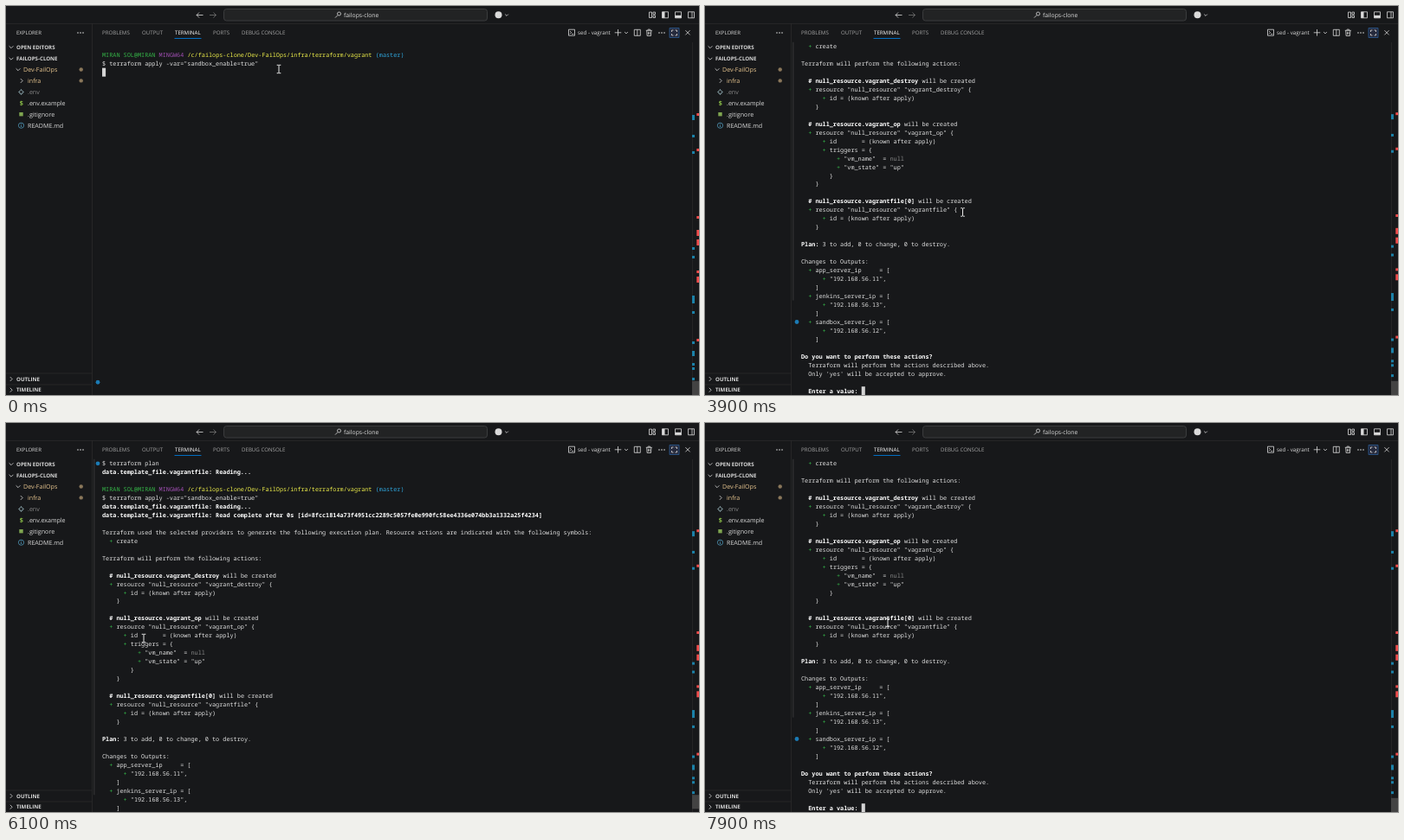
These frames come from a looping animation (800x450 px, 8000 ms). An HTML page with a canvas:

```html
<!DOCTYPE html>
<html lang="en">
<head>
<meta charset="utf-8">
<title>Terminal session</title>
<style>
html, body { margin: 0; width: 100%; height: 100%; overflow: hidden; background: #17181a; }
canvas { display: block; }
</style>
</head>
<body>
<canvas id="stage" width="800" height="450"></canvas>
<script>
const ctx = document.getElementById('stage').getContext('2d');
ctx.textRendering = 'geometricPrecision';

const LOOP = 8000, STEP = 100;
const LEFT = 111, TOP = 41.8, ROW = 9.96, CELL = 4.1, ROWS = 41;
const UI = '"Open Sans", sans-serif';
const MONO = '"Noto Sans Mono", monospace';
const LIGHT = '#dadada';
const INK = { n: '#e2e2e2', b: '#ffffff', g: '#35b548', m: '#a24fb4', y: '#efef4a', c: '#2fa8e0', d: '#858585' };

// "~x" switches the text style to INK.x
const lines = `$ terraform plan
~bdata.template_file.vagrantfile: Reading...

~gMIRAN SOL@MIRAN ~mMINGW64 ~y/c/failops-clone/Dev-FailOps/infra/terraform/vagrant ~c(master)
$ terraform apply -var="sandbox_enable=true"
~bdata.template_file.vagrantfile: Reading...
~bdata.template_file.vagrantfile: Read complete after 0s [id=8fcc1814a73f4951cc2289c5057fe0e990fc58ee4336e074bb3a1332a25f4234]

Terraform used the selected providers to generate the following execution plan. Resource actions are indicated with the following symbols:
  + create

Terraform will perform the following actions:

~b  # null_resource.vagrant_destroy~n will be created
  + resource "null_resource" "vagrant_destroy" {
      + id = (known after apply)
    }

~b  # null_resource.vagrant_op~n will be created
  + resource "null_resource" "vagrant_op" {
      + id       = (known after apply)
      + triggers = {
          + "vm_name"  = ~dnull
          + "vm_state" = "up"
        }
    }

~b  # null_resource.vagrantfile[0]~n will be created
  + resource "null_resource" "vagrantfile" {
      + id = (known after apply)
    }

~bPlan:~n 3 to add, 0 to change, 0 to destroy.

Changes to Outputs:
  + app_server_ip     = [
      + "192.168.56.11",
    ]
  + jenkins_server_ip = [
      + "192.168.56.13",
    ]
  + sandbox_server_ip = [
      + "192.168.56.12",
    ]

~bDo you want to perform these actions?
  Terraform will perform the actions described above.
  Only 'yes' will be accepted to approve.

~b  Enter a value: `.split('\n').map(line => line.replace(/^( +)\+/, '$1~g+~n'));

// [time, value] steps
const printed = [[0, 5], [1800, 6], [1900, 7], [2200, 44], [2800, 50]];
const scroll = [[0, 2], [2200, 4], [2800, 9], [4000, 7], [4100, 5], [4200, 3], [4300, 1], [4400, 0],
  [6700, 1], [6800, 3], [6900, 5], [7000, 9]];
const pointer = [[0, 315, 73], [1200, 315, 73], [1500, 315, 72], [3100, 315, 72], [3800, 297.5, 238.5],
  [4800, 297.5, 238.5], [5500, 200, 178], [5800, 190, 176], [6100, 159, 249], [6350, 130, 318],
  [6600, 264.5, 263], [7200, 264.5, 263], [7800, 211, 231], [LOOP, 211, 231]];

// Overview ruler: [top, height]
const blueMarks = [[126, 6], [149, 3], [168, 3], [279, 3], [289, 3], [335, 9], [353, 3], [388, 3],
  [399, 6], [413, 3], [418, 3], [430, 3]];
const redMarks = [[124, 3], [165, 3], [243, 3], [259, 7], [270, 7], [306, 3], [313, 7], [385, 3]];

const stepAt = (steps, t) => steps.findLast(([start]) => start <= t)[1];

function pointerAt(t) {
  const i = pointer.findIndex(p => p[0] > t);
  const a = pointer[i - 1], b = pointer[i];
  const u = (t - a[0]) / (b[0] - a[0]), e = u * u * (3 - 2 * u);
  return [a[1] + (b[1] - a[1]) * e, a[2] + (b[2] - a[2]) * e];
}

function rect(x, y, w, h, color) {
  ctx.fillStyle = color;
  ctx.fillRect(x, y, w, h);
}

function dot(x, y, r, color) {
  ctx.fillStyle = color;
  ctx.beginPath();
  ctx.arc(x, y, r, 0, 7);
  ctx.fill();
}

function text(str, x, y, size, color = LIGHT, weight = 400, family = UI) {
  ctx.font = `${weight} ${size}px ${family}`;
  ctx.fillStyle = color;
  ctx.fillText(str, x, y);
}

// SVG path data drawn around (x, y)
function icon(x, y, d, color = LIGHT, width = 0.8) {
  ctx.save();
  ctx.translate(x, y);
  ctx.strokeStyle = color;
  ctx.lineWidth = width;
  ctx.stroke(new Path2D(d));
  ctx.restore();
}

const DOWN = 'M-2.4-1.2L0 1.2L2.4-1.2', RIGHT = 'M-1.2-2.4L1.2 0L-1.2 2.4';
const BOX = 'M-3.5-3.5h7v7h-7z';

function ellipsis(x, y) {
  for (const dx of [-3, 0, 3]) dot(x + dx, y, 0.8, LIGHT);
}

function titleBar() {
  rect(0, 20, 800, 0.7, '#2b2b2b');
  icon(223.5, 10.5, 'M4 0H-3.5M-.5-3L-3.5 0L-.5 3');
  icon(239, 10.5, 'M-4 0H3.5M.5-3L3.5 0L.5 3', '#777777');
  ctx.beginPath();
  ctx.roundRect(251.5, 3.5, 304, 13.5, 3);
  ctx.fillStyle = '#222324';
  ctx.fill();
  ctx.strokeStyle = '#434446';
  ctx.lineWidth = 0.8;
  ctx.stroke();
  icon(383.5, 10, 'M3 -1a2 2 0 1 1-4 0a2 2 0 1 1 4 0M-.5 .6L-3.5 3.6');
  text('failops-clone', 390, 12.6, 6.8);
  dot(568.5, 10.3, 4, LIGHT);
  icon(578, 10.5, 'M-1.8-.9L0 .9L1.8-.9');
  icon(746, 10.3, 'M-3.5-3.2h3v6.4h-3zM1-3.2h2.5v2.5h-2.5zM1 .7h2.5v2.5h-2.5z');
  for (const x of [761, 776, 791]) icon(x, 10.3, BOX);
  rect(757.5, 6.8, 3, 7, LIGHT);
  rect(772.5, 10.8, 7, 3, LIGHT);
  icon(791, 10.3, 'M1-3.5v7');
}

function sidebar() {
  rect(99, 20, 0.8, 430, '#2b2b2b');
  text('EXPLORER', 12, 33.2, 6);
  ellipsis(86, 31);
  const sections = [['OPEN EDITORS', 47.5, DOWN], ['FAILOPS-CLONE', 61, DOWN],
    ['OUTLINE', 431.5, RIGHT], ['TIMELINE', 444.2, RIGHT]];
  for (const [name, y, arrow] of sections) {
    icon(6, y, arrow);
    text(name, 12, y + 2.2, 6.15, LIGHT, 700);
  }
  rect(0, 424.6, 99, 0.7, '#2b2b2b');
  rect(0, 437.6, 99, 0.7, '#2b2b2b');

  const gold = '#e8c690';
  icon(14, 73.5, DOWN);
  icon(18, 86.5, RIGHT);
  text('Dev-FailOps', 20, 76, 7.1, gold);
  text('infra', 25, 89, 7.1, gold);
  text('.env', 25, 102, 7.1, '#868686');
  text('.env.example', 25, 115, 7.1);
  text('.gitignore', 25, 128, 7.1);
  text('README.md', 25, 140.8, 7.1);
  dot(86.7, 73.5, 2.2, '#8a775a');
  dot(86.7, 86.4, 2.2, '#8a775a');
  icon(17.5, 99.5, 'M2 0a2 2 0 1 1-4 0a2 2 0 1 1 4 0M0-3.4v1.2M0 2.2v1.2M-3.4 0h1.2M2.2 0h1.2', '#6d8086', 1.1);
  text('$', 15.7, 115, 7.2, '#8dc149', 700);
  rect(15.3, 123, 4.4, 4.4, '#7fa650');
  icon(17.5, 138.2, 'M3.1 0a3.1 3.1 0 1 1-6.2 0a3.1 3.1 0 1 1 6.2 0M0-1.9v.9M0-.4v2.2', '#519aba');
}

function panelHeader() {
  const tabs = [['PROBLEMS', 111], ['OUTPUT', 157], ['TERMINAL', 195], ['PORTS', 239], ['DEBUG CONSOLE', 272]];
  for (const [name, x] of tabs) text(name, x, 33.2, 6.15, name === 'TERMINAL' ? '#ffffff' : '#a6a6a6');
  rect(194.5, 37, 31, 0.9, '#0078d4');
  icon(653, 30.7, BOX + 'M-2-1.7L-.3 0L-2 1.7M.4 1.8h1.8');
  text('sed - vagrant', 660, 33, 6.3);
  icon(706.5, 30.8, 'M-3.8 0h7.6M0-3.8v7.6');
  icon(716, 31, 'M-1.9-1L0 .9L1.9-1');
  icon(728.8, 30.8, BOX + 'M0-3.5v7');
  icon(742.3, 30.8, 'M-3.5-2.5h7M-1.2-2.5v-1.2h2.4v1.2M-2.6-2.5l.4 6.2h4.4l.4-6.2M-.8-1v3.2M.8-1v3.2');
  ellipsis(757, 31);
  rect(766, 25.5, 11, 11, '#262a3c');
  icon(771.5, 31, 'M-5.5-5.5h11v11h-11z', '#2b5c96');
  icon(771.5, 31, 'M-3-1v-2h2M1-3h2v2M3 1v2h-2M-1 3h-2v-2');
  icon(787, 30.8, 'M-2.6-2.6L2.6 2.6M2.6-2.6L-2.6 2.6');
}

function terminalLine(line, y) {
  let style = 'n', column = 0;
  line.split(/~(\w)/).forEach((part, i) => {
    if (i % 2) { style = part; return; }
    text(part, LEFT + column * CELL, y, CELL / 0.6, INK[style], style === 'b' ? 700 : 500, MONO);
    column += part.length;
  });
}

function terminal(t) {
  const count = stepAt(printed, t), top = stepAt(scroll, t);
  const rowY = i => TOP + (i - top) * ROW;
  const last = Math.min(count, top + ROWS);
  for (let i = top; i < last; i++) terminalLine(lines[i], rowY(i) + 7.3);

  const asking = count === lines.length;
  rect(LEFT + (asking ? 17 * CELL : 0), rowY(asking ? count - 1 : count), CELL, ROW, '#d4d4d4');

  for (const i of [0, 41]) {
    if (i >= top && i < top + ROWS) dot(106, rowY(i) + 5, 2.4, '#1b7bb5');
  }
  if (t >= 3300) rect(101.4, TOP, 0.9, rowY(39) - TOP, '#3c3c3c');
  return top;
}

function ruler(t, top) {
  const newest = t < 2200 ? 2 : t < 2800 ? 4 : 9;
  const shrink = 1 - (newest - 2) / 700;
  rect(792, 42, 0.7, 408, '#2b2b2b');
  rect(792, 433.8 - (newest - top) * 0.4, 8, 16.2, '#434343');
  const marks = (list, x, color) => {
    for (const [y, h] of list) rect(x, 42 + (y - 42) * shrink, 3, h, color);
  };
  marks(blueMarks, 792, '#1b81a8');
  marks(redMarks, 797.3, '#f14c4c');
}

function draw() {
  const t = Math.floor(performance.now() % LOOP / STEP) * STEP;
  rect(0, 0, 800, 450, '#17181a');
  titleBar();
  sidebar();
  panelHeader();
  ruler(t, terminal(t));
  const [x, y] = pointerAt(t);
  icon(x, y, 'M-2.3-4.7H-.6L0-4.2L.6-4.7H2.3M0-4.2V4.2M-2.3 4.7H-.6L0 4.2L.6 4.7H2.3', '#ffffff', 0.9);
  requestAnimationFrame(draw);
}
draw();
</script>
</body>
</html>
```
